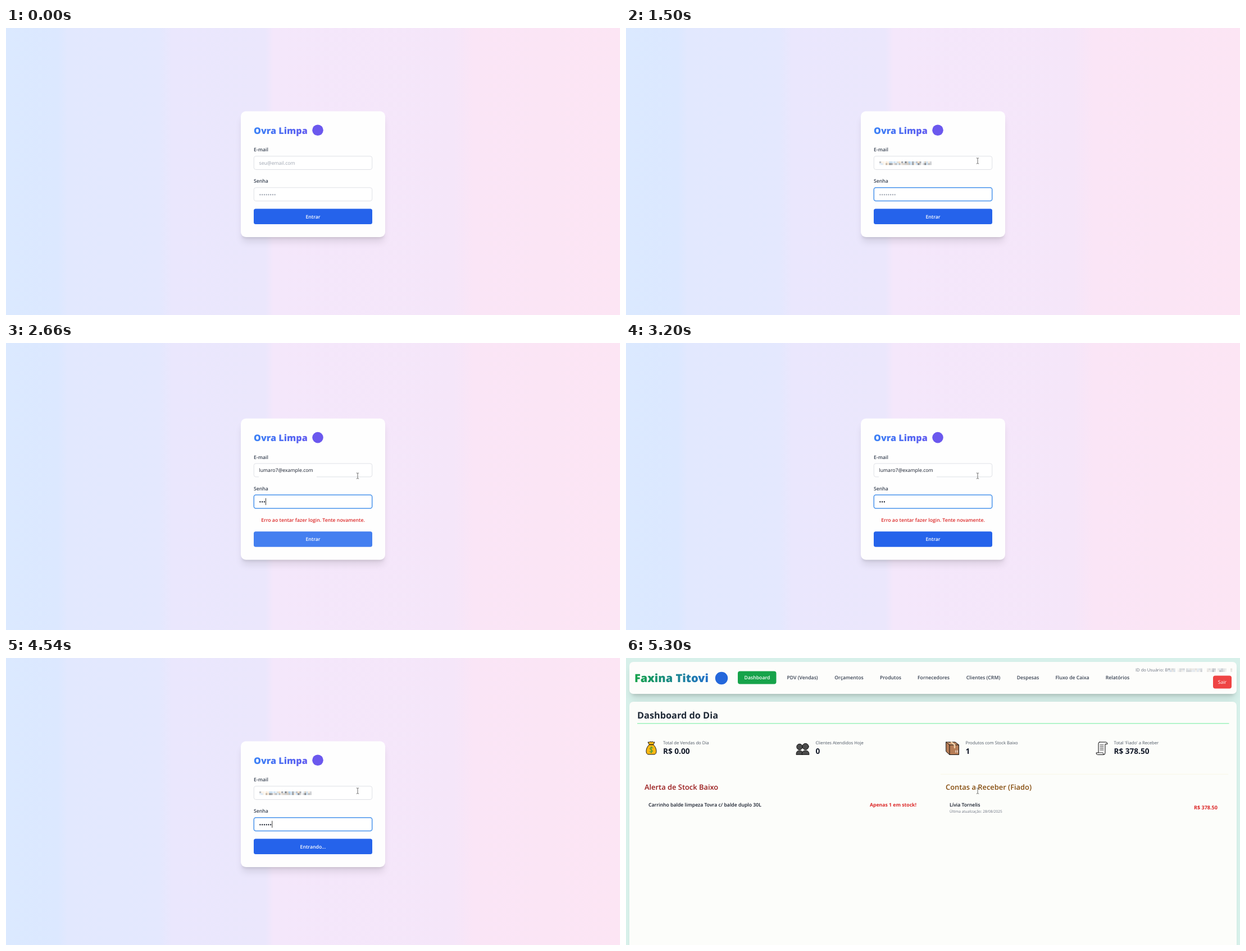
These frames come from a looping animation (1093 px wide and 512 px high, 8 s). An HTML page:

```html
<!DOCTYPE html>
<html lang="pt-BR">
<head>
<meta charset="utf-8">
<title>Login e painel</title>
<style>
  html, body { margin: 0; width: 100%; height: 100%; overflow: hidden; }
  svg { display: block; width: 100vw; height: 100vh; }
  text { font: 400 8.7px "Open Sans", "Noto Sans", sans-serif; text-rendering: geometricPrecision; white-space: pre; }
  .mid { text-anchor: middle; }
  .end { text-anchor: end; }
  .semi { font-weight: 600; }
  .bold { font-weight: 700; }
  .brand { font-weight: 800; }
  .label { font-weight: 600; fill: #374151; }
  .hint { fill: #9ca3af; }
  .dots { font-size: 10px; }
  .field { fill: #fff; stroke: #d1d5db; stroke-width: .7; }
  .white { fill: #fff; }
  .red { fill: #dc2626; }
  .ink { fill: #111827; }
  .section { font-size: 12.9px; font-weight: 600; }
  .statName { font-size: 7.7px; font-weight: 500; fill: #4b5563; }
  .statValue { font-size: 13.6px; font-weight: 700; fill: #111827; }
  .far { filter: blur(7px); opacity: .1; }
  .near { filter: blur(2.8px); opacity: .1; }
  .icon { stroke: #111; stroke-width: 1; stroke-linejoin: round; stroke-linecap: round; }
</style>
</head>
<body>
<svg viewBox="0 0 1093 512" preserveAspectRatio="none">
  <defs>
    <linearGradient id="sky">
      <stop offset="0" stop-color="#dbe9ff"/><stop offset=".085" stop-color="#dce8ff"/>
      <stop offset=".1" stop-color="#e2e8fe"/><stop offset=".25" stop-color="#e4e8fe"/>
      <stop offset=".27" stop-color="#eae7fd"/><stop offset=".422" stop-color="#ebe7fc"/>
      <stop offset=".436" stop-color="#f4e7fb"/><stop offset=".73" stop-color="#f5e6f9"/>
      <stop offset=".76" stop-color="#fae5f6"/><stop offset="1" stop-color="#fce5f4"/>
    </linearGradient>
    <linearGradient id="violet" gradientUnits="userSpaceOnUse" x1="441" x2="652" y1="0" y2="0">
      <stop stop-color="#3b82f6"/><stop offset="1" stop-color="#9333ea"/>
    </linearGradient>
    <linearGradient id="sea" gradientUnits="userSpaceOnUse" x1="15" x2="182" y1="0" y2="0">
      <stop stop-color="#16a34a"/><stop offset="1" stop-color="#2563eb"/>
    </linearGradient>
  </defs>

  <g id="login">
    <rect width="1093" height="512" fill="url(#sky)"/>
    <rect class="far card" x="421" width="251"/>
    <rect class="near card" x="421.5" width="250"/>
    <rect id="panel" x="418" width="257" rx="9" fill="#fefefe"/>

    <g id="upper">
      <text class="brand" x="441" y="188.5" style="font-size:16.2px" fill="url(#violet)">Ovra Limpa</text>
      <circle cx="555" cy="182.3" r="9.8" fill="#6b58ee"/>
      <text class="label" x="441" y="220.3">E-mail</text>
      <rect class="field" x="441.3" y="228.7" width="210.4" height="23.8" rx="3.5"/>
      <text id="emailHint" class="hint" x="450.5" y="244">seu@email.com</text>
      <g id="emailHidden"></g>
      <g id="emailShown">
        <rect x="450" y="250" width="103" height="4" fill="#fefefe"/>
        <text class="ink" x="450.5" y="244">lumaro7@example.com</text>
      </g>
      <text class="label" x="441" y="276.3">Senha</text>
      <rect id="password" class="field" x="441.3" y="284.8" width="210.4" height="23.8" rx="3.5"/>
      <text id="typed" class="dots" x="450.4" y="300.6"></text>
      <rect id="caret" y="290.5" width=".9" height="12.3" fill="#222"/>
    </g>

    <text id="error" class="mid semi red" x="546.5" y="318.8">Erro ao tentar fazer login. Tente novamente.</text>
    <g id="lower">
      <rect id="submit" x="441" y="322.5" width="211" height="27.5" rx="3.5"/>
      <text id="submitText" class="mid semi white" x="546.5" y="339.6"></text>
    </g>
  </g>

  <g id="dashboard">
    <rect width="1093" height="512" fill="#d7f0ea"/>
    <rect class="far" x="9" y="18" width="1075" height="54" rx="7"/>
    <rect class="near" x="9" y="14" width="1075" height="53" rx="7"/>
    <rect x="6" y="7" width="1081" height="57" rx="7" fill="#fdfdfb"/>
    <rect class="near" x="8" y="80" width="1077" height="450" rx="7"/>
    <rect x="6" y="78" width="1081" height="450" rx="7" fill="#fcfdfa"/>

    <text class="brand" x="15" y="43.3" style="font-size:20px" fill="url(#sea)">Faxina Titovi</text>
    <circle cx="170" cy="36" r="11.2" fill="#2467db"/>
    <rect x="199" y="23.5" width="68.5" height="23" rx="4" fill="#16a34a"/>
    <g id="nav"></g>
    <text x="907" y="24" style="font-size:7.6px" fill="#6b7280">ID do Usuário: B</text>
    <g id="userId"></g>
    <rect x="1045" y="31.5" width="33" height="23" rx="4" fill="#ef4444"/>
    <text class="mid white" x="1061.5" y="46.3">Sair</text>

    <text class="bold" x="20" y="108" style="font-size:16.3px" fill="#1f2937">Dashboard do Dia</text>
    <rect x="20" y="116.2" width="1053.5" height="1.2" fill="#86efac"/>
    <g id="stats"></g>

    <g class="icon">
      <g fill="#fdb913">
        <path d="M41 155C35 160 34 172 40 172H50C56 172 55 160 49 155Z"/>
        <path d="M41 154L39 150Q42 151 43 149Q45 151 47 149Q48 151 51 150L49 154Z"/>
        <path d="M48 160.5Q45 158.5 43 160.5T45 164T47 167Q45 169 42 167M45 158V169.500" fill="none" stroke="#159447"/>
      </g>
      <g fill="#4b4b4b">
        <path d="M303 172Q303 165 309 165T315 172Z"/><circle cx="309" cy="158.500" r="5.2"/>
        <path d="M313 172Q313 165 319.500 165T326 172Z"/><circle cx="319.500" cy="158" r="5.6"/>
      </g>
      <path d="M570 150H586L592.500 155V172.500H576L570 167Z" fill="#b77d56"/>
      <path d="M570 150L576 155H592.500M576 155V172.500" fill="#d9a47a"/>
      <path d="M579 150L585 155V160" fill="none" stroke="#f0d3ad" stroke-width="2.500"/>
      <path d="M587 168.500V165M590 168.500V165" fill="none" stroke="#fff"/>
      <path d="M843 150H854Q857 150 857 153.500H853V169Q853 172.500 850 172.500H839.500Q837 172.500 837 169H841V153Q841 150 843 150Z" fill="#f5f5f5"/>
      <path d="M844 155H850M844 158H850M844 161H850M844 164H850M841 169H849Q849 172 851 172" fill="none" stroke-width=".8"/>
    </g>

    <rect x="560" y="206.800" width="512" height=".8" fill="#f8f5df"/>
    <text class="section" x="33" y="235" fill="#991b1b">Alerta de Stock Baixo</text>
    <text class="section" x="569" y="235" fill="#854d0e">Contas a Receber (Fiado)</text>
    <text class="semi ink" x="40" y="265">Carrinho balde limpeza Tovra c/ balde duplo 30L</text>
    <text class="bold red end" x="517" y="265">Apenas 1 em stock!</text>
    <text class="semi ink" x="576" y="265">Lívia Tornelis</text>
    <text x="576" y="276" style="font-size:6.5px" fill="#6b7280">Última atualização: 28/08/2025</text>
    <text class="bold red end" x="1053" y="269.6" style="font-size:9.1px">R$ 378.50</text>
  </g>

  <g id="pointer">
    <circle id="click" cx="-1.5" r="6.8" fill="#fdf05a"/>
    <path id="beam" d="M-2.200 -5H-.7L0 -4.300L.7 -5H2.200M0 -4.300V4.300M-2.200 5H-.7L0 4.300L.7 5H2.200" fill="none" stroke="#444" stroke-width=".8"/>
    <path id="arrow" d="M0 0V9.500L2.200 7.500L3.800 11L5.300 10.300L3.700 7H6.700Z" fill="#fff" stroke="#111" stroke-width=".6"/>
  </g>
</svg>
<script>
const LOOP = 8000, STEP = 70;
const $ = id => document.getElementById(id);
const show = (id, on) => $(id).setAttribute('display', on ? 'inline' : 'none');
const within = (t, from, to) => t >= from && t < to;

function add(parent, tag, attrs, content = '') {
  const node = document.createElementNS('http://www.w3.org/2000/svg', tag);
  for (const key in attrs) node.setAttribute(key, attrs[key]);
  node.textContent = content;
  parent.append(node);
}

// Blurred-out words: small coloured cells over the given horizontal spans.
function mosaic(id, spans, top, rows, cell, colours) {
  let seed = 7;
  const random = () => (seed = seed * 16807 % 2147483647) / 2147483647;
  for (const [from, to, strength] of spans)
    for (let x = from; x < to; x += cell)
      for (let row = 0; row < rows; row++)
        add($(id), 'rect', {
          x, y: top + row * cell, width: cell, height: cell,
          fill: colours[Math.floor(random() * colours.length)],
          opacity: strength * (.3 + .7 * random())
        });
}
mosaic('emailHidden', [[451, 459, .4], [462, 473, 1], [476, 488, .8], [490, 513, 1], [516, 525, .8], [528, 544, .8]],
  238, 2, 3.2, ['#50555d', '#8bbce8', '#b8a590', '#777b82', '#f3d5b2', '#bdd9ef']);
mosaic('userId', [[965, 975, .7], [982, 992, .5], [997, 1025, .7], [1034, 1050, .7], [1053, 1068, .6], [1076, 1079, 1]],
  18.5, 2, 3.2, ['#8f949d', '#b8c9dc', '#d8d2cc', '#a5aab3']);

const nav = [['Dashboard', 233.5], ['PDV (Vendas)', 314], ['Orçamentos', 397], ['Produtos', 471],
  ['Fornecedores', 547.5], ['Clientes (CRM)', 636], ['Despesas', 715.5], ['Fluxo de Caixa', 794.5], ['Relatórios', 875]];
nav.forEach(([name, x], i) =>
  add($('nav'), 'text', { x, y: 38.3, class: 'mid ' + (i ? 'label' : 'semi white') }, name));

const stats = [['Total de Vendas do Dia', 'R$ 0.00', 66], ['Clientes Atendidos Hoje', '0', 337.5],
  ['Produtos com Stock Baixo', '1', 604.5], ["Total 'Fiado' a Receber", 'R$ 378.50', 868.5]];
for (const [name, value, x] of stats) {
  add($('stats'), 'text', { x, y: 153.5, class: 'statName' }, name);
  add($('stats'), 'text', { x, y: 171.3, class: 'statValue' }, value);
}

const keyTimes = [1980, 2050, 2120, 4010, 4080, 4280];
const dark = [37, 99, 235], light = [147, 197, 253];

function fade(t, start) {
  const p = Math.floor((t - start) / STEP) * STEP / 150;
  return 1 - (1 - Math.min(1, Math.max(0, p))) ** 2;
}

function drawLogin(t) {
  const busy = within(t, 2320, 2590) || t >= 4540;
  const failed = within(t, 2590, 4540);
  const filled = t >= 1100, focused = t >= 1170;
  const shift = failed ? 13.7 : 0;
  const top = 148.5 - shift, height = 224.5 + 2 * shift;

  $('panel').setAttribute('y', top);
  $('panel').setAttribute('height', height);
  document.querySelectorAll('.card').forEach((shadow, i) => {
    shadow.setAttribute('y', top + (i ? 8 : 14.5));
    shadow.setAttribute('height', height - 6.5);
  });
  $('upper').setAttribute('transform', `translate(0 ${-shift})`);
  $('lower').setAttribute('transform', `translate(0 ${shift})`);
  show('error', failed);
  show('emailHint', !filled);
  show('emailHidden', filled && !failed);
  show('emailShown', failed);

  const count = keyTimes.filter(key => key <= t).length;
  $('typed').textContent = '•'.repeat(count || 8);
  $('typed').setAttribute('fill', count ? '#111827' : '#9ca3af');
  $('password').style.stroke = focused ? '#4a94ec' : '';
  $('password').style.strokeWidth = focused ? 1.5 : '';
  $('caret').setAttribute('x', 450.8 + count * 3.76);
  show('caret', focused && !within(t, 1500, 1980) && !within(t, 3200, 3600) && t < 4820);

  const mix = fade(t, 2320) - fade(t, 2590) + fade(t, 4540);
  $('submit').setAttribute('fill', `rgb(${dark.map((c, i) => Math.round(c + (light[i] - c) * mix))})`);
  $('submitText').textContent = busy ? 'Entrando...' : 'Entrar';
}

function drawPointer(t) {
  const p = Math.min(1, Math.max(0, (Math.floor(t / STEP) - 1) / 9));
  const u = p * p * (3 - 2 * p);
  const curve = (a, b, c) => (1 - u) ** 2 * a + 2 * u * (1 - u) * b + u * u * c;
  const x = curve(965, 620, 626), y = curve(473, 150, 237);
  const overField = x < 652 && y > 228 && y < 253;
  $('pointer').setAttribute('transform', `translate(${x} ${y})`);
  show('pointer', t >= STEP);
  show('click', within(t, 900, 1100));
  show('beam', overField);
  show('arrow', !overField);
}

function frame() {
  const t = performance.now() % LOOP;
  const signedIn = t >= 5300;
  show('login', !signedIn);
  show('dashboard', signedIn);
  if (!signedIn) drawLogin(t);
  drawPointer(t);
  requestAnimationFrame(frame);
}
frame();
</script>
</body>
</html>
```
